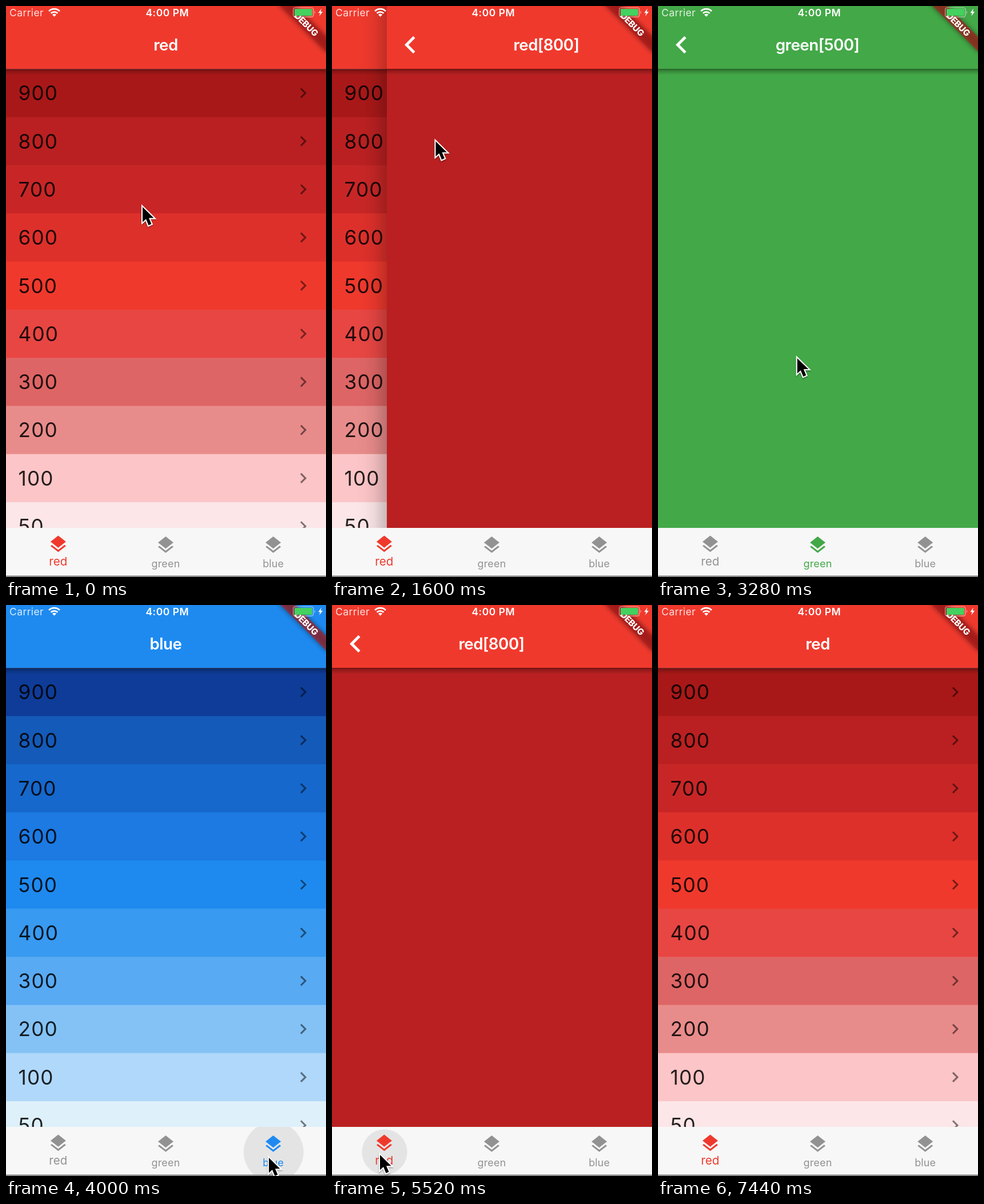
Write an HTML page that moves like this. It is 560 px wide and 1000 px high and loops after 7.52 s.

```html
<!DOCTYPE html>
<html lang="en">
<head>
<meta charset="utf-8">
<title>Tabs with their own pages</title>
<style>
  html, body { margin: 0; width: 100%; height: 100%; overflow: hidden; background: #f7f7f7; }
  svg { display: block; width: 100%; height: 100%; font-family: Inter, Roboto, sans-serif; }
  .title { font-size: 27.8px; font-weight: 560; letter-spacing: -.55px; fill: #fff; text-anchor: middle; }
  .num { font-size: 35.2px; letter-spacing: 1.1px; fill: #000; fill-opacity: .86; }
  .label { text-anchor: middle; letter-spacing: .15px; }
</style>
</head>
<body>
<svg id="stage" viewBox="0 0 560 1000">
  <defs>
    <linearGradient id="drop" x1="0" y1="0" x2="0" y2="1">
      <stop offset="0" stop-opacity=".42"/>
      <stop offset=".35" stop-opacity=".2"/>
      <stop offset="1" stop-opacity="0"/>
    </linearGradient>
    <linearGradient id="edge">
      <stop offset="0" stop-opacity="0"/>
      <stop offset=".3" stop-opacity=".016"/>
      <stop offset=".6" stop-opacity=".07"/>
      <stop offset="1" stop-opacity=".24"/>
    </linearGradient>
    <filter id="soft" x="-30%" y="-150%" width="160%" height="400%"><feGaussianBlur stdDeviation="5"/></filter>
    <filter id="lift" x="-30%" y="-30%" width="170%" height="170%">
      <feDropShadow dx="0" dy="1.5" stdDeviation="1.2" flood-opacity=".4"/>
    </filter>
    <clipPath id="barClip"><rect y="914" width="560" height="84"/></clipPath>
    <path id="layers" d="M11.99 18.54l-7.37-5.73L3 14.07l9 7 9-7-1.63-1.27zM12 16l7.36-5.73L21 9l-9-7-9 7 1.63 1.27z"/>
    <path id="next" d="M10 6L8.59 7.41 13.17 12l-4.58 4.59L10 18l6-6z"/>
  </defs>

  <g id="list"></g>

  <g id="page">
    <rect id="edgeShade" x="-56" width="56" height="914" fill="url(#edge)"/>
    <rect id="pageBody" width="560" height="914"/>
    <rect id="pageHead" width="560" height="110"/>
    <rect y="110" width="560" height="11" fill="url(#drop)"/>
    <path d="M11.67 3.87L9.9 2.1 0 12l9.9 9.9 1.77-1.77L3.54 12z" transform="translate(31.8 50.6) scale(1.45)" fill="#fff" stroke="#fff" stroke-width=".8"/>
    <text id="pageTitle" class="title" x="279" y="78"></text>
  </g>

  <g id="bar">
    <rect y="914" width="560" height="86" fill="#f7f7f7"/>
    <circle id="ripple" cy="958" clip-path="url(#barClip)"/>
    <rect y="997.5" width="560" height="2.5" fill="#858585"/>
  </g>

  <g transform="translate(561.7 -4) rotate(45)">
    <rect x="-60.2" y="42.1" width="120.4" height="18.1" fill-opacity=".5" filter="url(#soft)"/>
    <rect x="-60.2" y="42.1" width="120.4" height="18.1" fill="#b71c1c" fill-opacity=".63"/>
    <text y="56.7" font-size="15.2" font-weight="800" text-anchor="middle" letter-spacing="-.3" fill="#fff">DEBUG</text>
  </g>

  <g id="status" fill="#fff">
    <text x="6" y="18" font-size="17.5" letter-spacing=".4" opacity=".85">Carrier</text>
    <text x="282.3" y="18" font-size="17.5" font-weight="600" letter-spacing=".5" text-anchor="middle">4:00 PM</text>
    <path d="M84.5 18.8L81 15.2A5 5 0 0 1 88 15.2Z"/>
    <path d="M78.6 12.7A8.4 8.4 0 0 1 90.4 12.7M75.1 9.1A13.3 13.3 0 0 1 93.9 9.1" fill="none" stroke="#fff" stroke-width="2.8"/>
    <rect x="502.7" y="2.9" width="35.2" height="16.4" rx="3.5" fill="none" stroke="#fff" stroke-opacity=".5" stroke-width="1.4"/>
    <rect x="505" y="5" width="30.8" height="12.2" rx="1.2" fill="#43d15f"/>
    <path d="M539.8 8.2q2.6 2.9 0 5.8z" fill-opacity=".55"/>
    <path d="M552 4.5l-5.6 7.7h3.4l-1.6 5.6 6-7.8h-3.5z"/>
  </g>

  <g id="cursor" filter="url(#lift)">
    <path d="M2 5V31.5L8 26 12.5 37 17.5 34.8 13 24.2H21.5Z" stroke="#fff" stroke-width="4" paint-order="stroke"/>
  </g>
</svg>

<script>
const LOOP = 7520, STEP = 80, SLIDE = 350, ROW = 84.3;
const SCALE = 1.505, HALF_ICON = 12 * SCALE;
const GREY = '#929292';
const shades = [900, 800, 700, 600, 500, 400, 300, 200, 100, 50];

// Row colours from 900 to 50; open/close are the times the inner page slides.
const tabs = [
  { name: 'red', x: 91.4, iconY: 924.6, textY: 980, size: 20.5, pick: 800, open: 1373, close: 6400,
    rows: 'a91818 ba2021 c82626 de302b f0392d e84643 de6565 e88c8b fcc5c7 fce6e8'.split(' ') },
  { name: 'green', x: 279.5, iconY: 926.1, textY: 983, size: 18, pick: 500, open: 2890, close: Infinity,
    rows: '18501c 28702c 308234 3c963e 43a847 5cb460 75c078 9bd0a0 c2e0be e2f2e4'.split(' ') },
  { name: 'blue', x: 467.7, iconY: 926.1, textY: 983, size: 18, pick: 300, open: 4546, close: Infinity,
    rows: '0e3c98 145ab8 1668cc 1c7ae2 1e8af0 389af0 58aaf3 84c2f5 b0d8fa def0fa'.split(' ') }
];

// Tab presses: time the tab changes and which one it becomes.
const taps = [[2400, 1], [3920, 2], [5520, 0]];

// Pointer stops: time, x, y.
const stops = [
  [200, 237, 347], [1120, 179.5, 232], [1680, 179.5, 232], [2200, 270, 955],
  [2420, 270, 955], [2760, 166, 489], [3080, 166, 489], [3680, 458, 963],
  [4080, 458, 963], [4440, 186, 659], [4960, 186, 659], [5320, 82, 958],
  [5560, 82, 958], [6160, 65, 66], [6480, 65, 66], [6960, 80, -50]
];

const $ = id => document.getElementById(id);
const clamp = v => Math.max(0, Math.min(1, v));
const smooth = u => u * u * (3 - 2 * u);
const move = (el, x, y) => el.setAttribute('transform', `translate(${x} ${y})`);

function add(parent, tag, attrs, text) {
  const el = document.createElementNS('http://www.w3.org/2000/svg', tag);
  for (const key in attrs) el.setAttribute(key, attrs[key]);
  if (text !== undefined) el.textContent = text;
  parent.appendChild(el);
  return el;
}

const addIcon = (parent, id, x, y, attrs) =>
  add(parent, 'use', { href: '#' + id, transform: `translate(${x} ${y}) scale(${SCALE})`, ...attrs });

// cubic-bezier(0, 0, .58, 1)
function easeOut(x) {
  let lo = 0, hi = 1;
  for (let i = 0; i < 24; i++) {
    const s = (lo + hi) / 2;
    if (1.74 * s * s * (1 - s) + s * s * s < x) lo = s; else hi = s;
  }
  return smooth(lo);
}

const list = $('list');
const rowRects = shades.map((shade, i) => {
  const y = 110.3 + ROW * i, mid = 152.5 + ROW * i;
  const rect = add(list, 'rect', { y, width: 560, height: ROW + 1 });
  add(list, 'text', { class: 'num', x: 21.6, y: mid + 12.8 }, shade);
  addIcon(list, 'next', 502, mid - HALF_ICON, { 'fill-opacity': .5 });
  return rect;
});
const listHead = add(list, 'rect', { width: 560, height: 110 });
add(list, 'rect', { y: 110, width: 560, height: 11, fill: 'url(#drop)' });
const listTitle = add(list, 'text', { class: 'title', x: 279.5, y: 78 });

const buttons = tabs.map(tab => {
  const g = add($('bar'), 'g', {});
  addIcon(g, 'layers', tab.x - HALF_ICON, tab.iconY);
  add(g, 'text', { class: 'label', x: tab.x, y: tab.textY, 'font-size': tab.size }, tab.name);
  return g;
});

function showTab(index) {
  const tab = tabs[index], main = '#' + tab.rows[4];
  rowRects.forEach((rect, i) => rect.setAttribute('fill', '#' + tab.rows[i]));
  listHead.setAttribute('fill', main);
  listTitle.textContent = tab.name;
  $('pageHead').setAttribute('fill', main);
  $('pageBody').setAttribute('fill', '#' + tab.rows[shades.indexOf(tab.pick)]);
  $('pageTitle').textContent = `${tab.name}[${tab.pick}]`;
  buttons.forEach((g, i) => g.setAttribute('fill', i === index ? main : GREY));
}

function slidePage(tab, t) {
  const shown = easeOut(clamp((t - tab.open) / SLIDE)) - easeOut(clamp((t - tab.close) / SLIDE));
  move($('page'), 560 * (1 - shown), 0);
  $('page').setAttribute('visibility', shown > 0 ? 'visible' : 'hidden');
  $('edgeShade').setAttribute('opacity', shown);
}

function drawRipple(t) {
  const tap = taps.find(([at]) => t >= at - 160 && t < at + 320);
  const ripple = $('ripple');
  if (!tap) return ripple.setAttribute('fill-opacity', 0);
  const [at, index] = tap;
  const grow = clamp((t - at + 160) / 240);
  const fade = 1 - clamp((t - at - 80) / 240);
  ripple.setAttribute('cx', tabs[index].x + .6);
  ripple.setAttribute('r', 14 + 38.5 * grow);
  ripple.setAttribute('fill-opacity', .08 * clamp(grow * 2) * fade);
}

function pointerAt(t) {
  const i = stops.findIndex(([at]) => at > t);
  if (i === 0) return stops[0].slice(1);
  if (i < 0) return stops[stops.length - 1].slice(1);
  const [t0, x0, y0] = stops[i - 1], [t1, x1, y1] = stops[i];
  const s = smooth((t - t0) / (t1 - t0));
  return [x0 + (x1 - x0) * s, y0 + (y1 - y0) * s];
}

function render(time) {
  const t = Math.floor((time % LOOP) / STEP) * STEP;
  const index = taps.reduce((now, [at, next]) => t >= at ? next : now, 0);
  showTab(index);
  slidePage(tabs[index], t);
  drawRipple(t);
  move($('cursor'), ...pointerAt(t));
}

const start = performance.now();
function tick() {
  render(performance.now() - start);
  requestAnimationFrame(tick);
}
tick();
</script>
</body>
</html>
```
